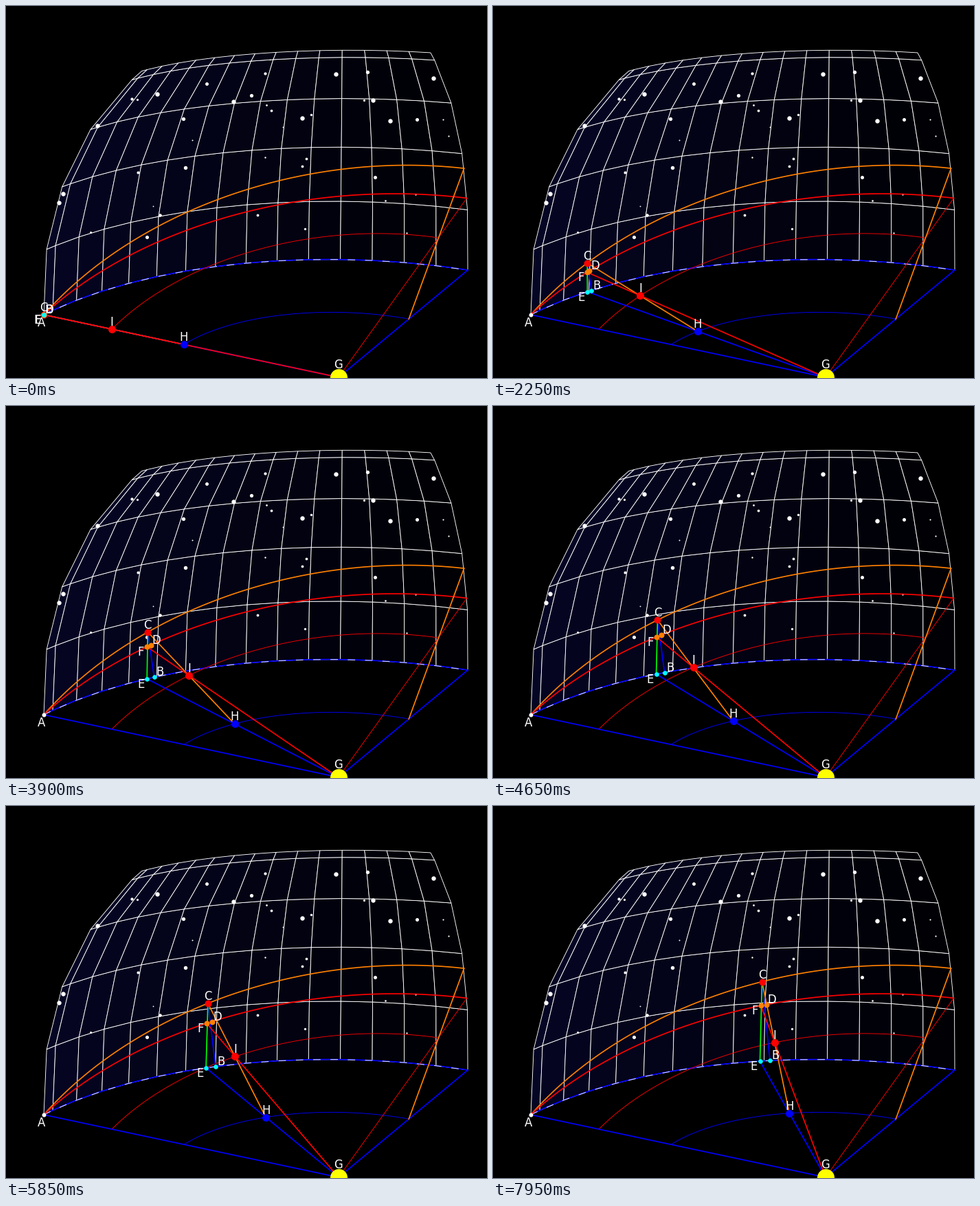
Write a matplotlib script that moves like this. It is 700 by 541 pixels and loops after 8000 ms.

```python
import numpy as np
import matplotlib.pyplot as plt
from matplotlib.animation import FuncAnimation
from matplotlib.collections import PolyCollection

W, H, DPI = 700, 541, 100
PX = 72 / DPI                       # points per pixel
STEP_MS, TICK_MS, LOOP_MS = 150, 50, 8000
DEG_PER_STEP = 0.975

BLUE, RED, ORANGE = "#0000ff", "#ff0000", "#ff8000"
CYAN, GREEN, YELLOW = "#00ffff", "#00ff00", "#ffff00"
THIN, THICK = 0.9, 1.7

# Perspective: images of the centre and of the 0 and 90 degree horizon points,
# each with its depth weight, and the homogeneous image of the upward axis.
CENTRE = np.array([484, 540, 1])
LEFT = 1.152 * np.array([55, 449, 1])
RIGHT = 1.245 * np.array([672, 384, 1])
AXES = np.array([LEFT - CENTRE, RIGHT - CENTRE, (-29, -539.5, -0.07)])
ORBIT_H, ORBIT_I = 0.489, 0.743
TILT_ORANGE, TILT_RED = 21.6, 15.0


def project(lon, lat=0.0, radius=1.0):
    lon, lat = np.broadcast_arrays(np.radians(lon), np.radians(lat))
    xyz = radius * np.stack([np.cos(lat) * np.cos(lon),
                             np.cos(lat) * np.sin(lon),
                             np.sin(lat)], axis=-1)
    h = CENTRE + xyz @ AXES
    return h[..., :2] / h[..., 2:]


def tilted_lat(lon, tilt):
    return np.degrees(np.arctan(np.tan(np.radians(tilt)) * np.sin(np.radians(lon))))


fig = plt.figure(figsize=(W / DPI, H / DPI), dpi=DPI, facecolor="black")
ax = fig.add_axes([0, 0, 1, 1])
ax.set_xlim(0, W)
ax.set_ylim(H, 0)
ax.axis("off")


def line(points, color, width, z, **style):
    return ax.plot(*np.transpose(points), color=color, lw=width * PX, zorder=z,
                   **style)[0]


def dot(color, radius, z, at=(0, 0)):
    return ax.plot([at[0]], [at[1]], "o", color=color, ms=2 * radius * PX,
                   mew=0, zorder=z)[0]


def label(name, x=0, y=0):
    return ax.text(x, y, name, color="white", fontsize=16.5 * PX, ha="center",
                   va="baseline", family="DejaVu Sans", zorder=20)


# Sky patch, darkening to the right
lons = np.append(0, np.arange(2.5, 91, 6.25))
lats = np.append(np.arange(0, 51, 12.5), 52.5)
quads, fills = [], []
for i, fade in enumerate(np.linspace(1, 0, len(lons) - 1)):
    for j in range(len(lats) - 1):
        quads.append(project(lons[[i, i + 1, i + 1, i]], lats[[j, j, j + 1, j + 1]]))
        fills.append((0.02 * fade, 0.02 * fade, 0.02 + 0.12 * fade))
ax.add_collection(PolyCollection(quads, facecolors=fills, edgecolors="white",
                                 linewidths=THIN * PX, zorder=1))

# A few bright stars, the rest scattered
bright = [(480, 99), (220, 128), (331, 139), (431, 163), (534, 137),
          (559, 167), (622, 105), (133, 174), (83, 273), (77, 286)]
for spot in bright:
    dot("white", 3.2, 2, spot)
rng = np.random.default_rng(7)
for spot in project(rng.uniform(8, 88, 32), rng.uniform(6, 51, 32)):
    dot("white", rng.uniform(0.7, 2.8), 2, spot)

# Fixed circles and rays
arc = np.linspace(0, 90, 91)
line(project(arc), BLUE, THICK, 3)
line(project(lons), "white", THIN, 3.1, dashes=(12, 16))
line(project(arc, tilted_lat(arc, TILT_ORANGE)), ORANGE, THICK, 3.2)
line(project(arc, tilted_lat(arc, TILT_RED)), RED, THICK, 3.2)
line(project(arc, tilted_lat(arc, TILT_RED), ORBIT_I), RED, THIN, 3)
line(project(arc, 0, ORBIT_H), BLUE, THIN, 3)

centre, start = CENTRE[:2], project(0)
line([centre, start], BLUE, THICK, 4)
line([centre, project(90)], BLUE, THICK, 4)
line([centre, project(90, TILT_RED)], RED, THIN, 4)
line([project(90, 0, ORBIT_H), project(90, TILT_ORANGE)], ORANGE, THICK, 4)
dot("white", 3, 4.5, start)
dot(YELLOW, 12.5, 10, centre)
label("A", 51, 466)
label("G", 483, 527)

# White edge along the right and the bottom
line([(W - 0.5, 0), (W - 0.5, H - 0.5), (0, H - 0.5)], "white", 1, 30)

# Moving rays by their end points, in drawing order
RAYS = {"EG": BLUE, "CB": BLUE, "CE": GREEN, "CH": ORANGE, "FG": RED}
rays = {ends: line([centre, centre], color, THICK, 5) for ends, color in RAYS.items()}

# Moving points: colour, radius, label offset
POINTS = {"H": (BLUE, 5.5, (0, -11)), "I": (RED, 5.5, (0, -11)),
          "C": (RED, 5, (0, -11)), "F": (ORANGE, 4, (-9, 7)),
          "D": (ORANGE, 4, (8, -8)), "E": (CYAN, 3.3, (-9, 7)),
          "B": (CYAN, 3.3, (8, -8))}
dots = {name: dot(color, radius, 11) for name, (color, radius, _) in POINTS.items()}
names = {name: label(name) for name in POINTS}


def positions(step):
    lon = DEG_PER_STEP * step
    shift = np.sin(np.radians(2 * lon))
    lon_d = lon + 1.15 * shift
    red_lat = tilted_lat(lon, TILT_RED)
    return {"G": centre,
            "E": project(lon),
            "H": project(lon, 0, ORBIT_H),
            "I": project(lon, red_lat, ORBIT_I),
            "F": project(lon, red_lat),
            "C": project(lon, tilted_lat(lon, TILT_ORANGE)),
            "D": project(lon_d, tilted_lat(lon_d, TILT_RED)),
            "B": project(lon + 2.05 * shift)}


def update(tick):
    at = positions(tick * TICK_MS // STEP_MS)
    for (a, b), ray in rays.items():
        ray.set_data(*zip(at[a], at[b]))
    for name, (_, _, (dx, dy)) in POINTS.items():
        x, y = at[name]
        dots[name].set_data([x], [y])
        names[name].set_position((x + dx, y + dy + 6))
    return [*rays.values(), *dots.values(), *names.values()]


anim = FuncAnimation(fig, update, frames=LOOP_MS // TICK_MS, interval=TICK_MS,
                     repeat=True, repeat_delay=0, blit=False)
plt.show()
```
